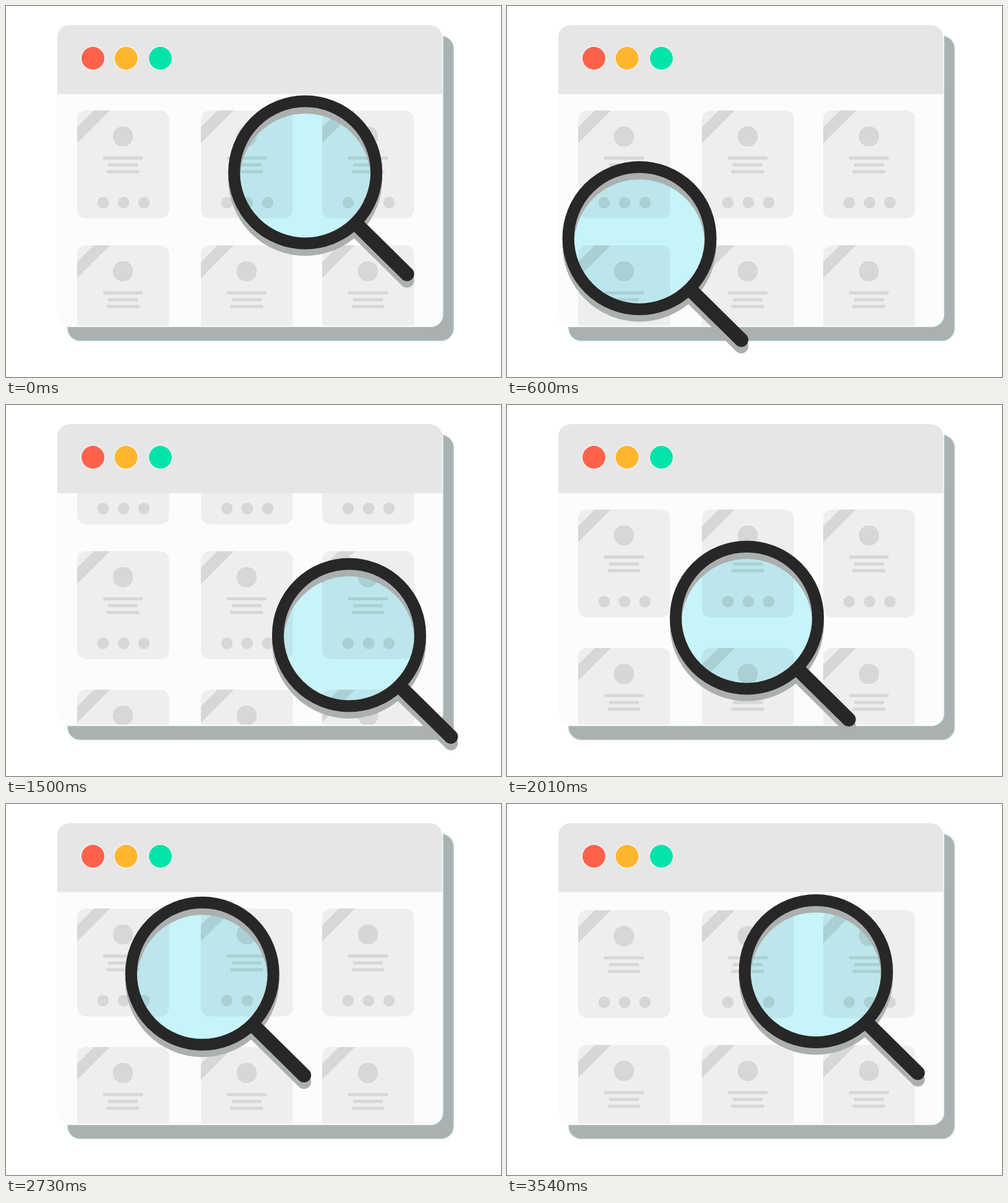
These frames come from a looping animation (800x600 px, 3570 ms). An HTML page with a canvas:

```html
<!DOCTYPE html>
<html lang="en">
<head>
<meta charset="utf-8">
<style>
html, body { margin: 0; width: 100%; height: 100%; overflow: hidden; background: #fff; }
canvas { display: block; }
</style>
</head>
<body>
<canvas id="stage" width="800" height="600"></canvas>
<script>
const ctx = document.getElementById('stage').getContext('2d');
const STEP = 30, LOOP = 119;
const { cos, sin, PI } = Math;

// Figure of eight, run twice per loop
function lensAt(t) {
  const a = (t + 7.5) / LOOP * 4 * PI;
  return [
    389 + 159 * cos(a) + 19.5 * cos(3 * a) - 6 * cos(a) ** 2,
    342 - 73 * sin(2 * a)
  ];
}

function ease(t, from, to) {
  const u = Math.min(1, Math.max(0, (t - from) / (to - from)));
  return u * u * (3 - 2 * u);
}

// Row spacing alternates between 218 and 224
const rowTop = i => 218 * i + 6 * Math.floor(i / 2);

function paint(fill, stroke) {
  ctx.fillStyle = fill;
  ctx.fill();
  if (!stroke) return;
  ctx.strokeStyle = stroke;
  ctx.stroke();
}

function box(x, y, w, h, r, fill, stroke) {
  ctx.beginPath();
  ctx.roundRect(x, y, w, h, r);
  paint(fill, stroke);
}

function disc(x, y, r, fill, stroke) {
  ctx.beginPath();
  ctx.arc(x, y, r, 0, 2 * PI);
  paint(fill, stroke);
}

function card(x, y) {
  const ink = '#d7d7d7', halo = '#f3f3f3';
  ctx.save();
  ctx.translate(x, y);
  box(0, 0, 148.5, 174.5, 14, '#eee');
  ctx.beginPath();
  ctx.moveTo(0, 27);
  ctx.lineTo(27, 0);
  ctx.lineTo(53, 0);
  ctx.lineTo(0, 53);
  paint(ink);
  disc(74, 42, 17, ink, halo);
  [64, 48, 53].forEach((w, i) => box(74 - w / 2, 74.5 + 11 * i, w, 5, 1, ink));
  for (let i = 0; i < 3; i++) disc(42 + 33 * i, 149, 10, ink, halo);
  ctx.restore();
}

function browser(scroll) {
  const edge = '#a9c3c3';
  ctx.lineWidth = 1.5;
  box(100, 49, 623, 492, 20, '#abb0b0', edge);
  box(60, 20, 647, 499.5, [0, 0, 20, 0], '#fff', edge);
  ctx.fillStyle = '#fff';
  ctx.fillRect(58, 18, 41, 530);
  ctx.fillRect(58, 18, 670, 30);
  box(83, 31, 622.5, 488, 20, '#fcfcfc');

  ctx.save();
  ctx.beginPath();
  ctx.rect(83, 142, 623, 375);
  ctx.clip();
  ctx.lineWidth = 1;
  for (let row = 0; row < 4; row++)
    for (const x of [115, 315, 511]) card(x, 169 + rowTop(row) - scroll);
  ctx.restore();

  box(83, 31, 622, 111.5, [20, 20, 0, 0], '#e6e6e6');
  ['#ff624b', '#ffb62e', '#00e4aa'].forEach((color, i) => {
    const x = 140.5 + 54.5 * i - (i === 1);
    disc(x, 84.5, 20, '#f3f3f3');
    disc(x, 84.5, 18.5, color);
  });
}

function frame(x, y, color) {
  ctx.strokeStyle = color;
  ctx.lineWidth = 19;
  ctx.beginPath();
  ctx.arc(x, y, 115, 0, 2 * PI);
  ctx.stroke();
  ctx.lineWidth = 23;
  ctx.lineCap = 'round';
  ctx.beginPath();
  ctx.moveTo(x + 84, y + 85);
  ctx.lineTo(x + 164.5, y + 164.5);
  ctx.stroke();
}

function lens(x, y) {
  ctx.globalCompositeOperation = 'multiply';
  disc(x, y, 106, '#caf7fc');
  ctx.globalCompositeOperation = 'source-over';
  frame(x, y + 10.5, '#abafaf');
  frame(x, y, '#272727');
}

function draw(now) {
  const t = Math.floor(now / STEP) % LOOP;
  ctx.fillStyle = '#fff';
  ctx.fillRect(0, 0, 800, 600);
  browser(218 * ease(t, 37.4, 57.4) + 224 * ease(t, 99, 119.3));
  lens(...lensAt(t));
}

const start = performance.now();
function tick() {
  draw(performance.now() - start);
  requestAnimationFrame(tick);
}
tick();
</script>
</body>
</html>
```
